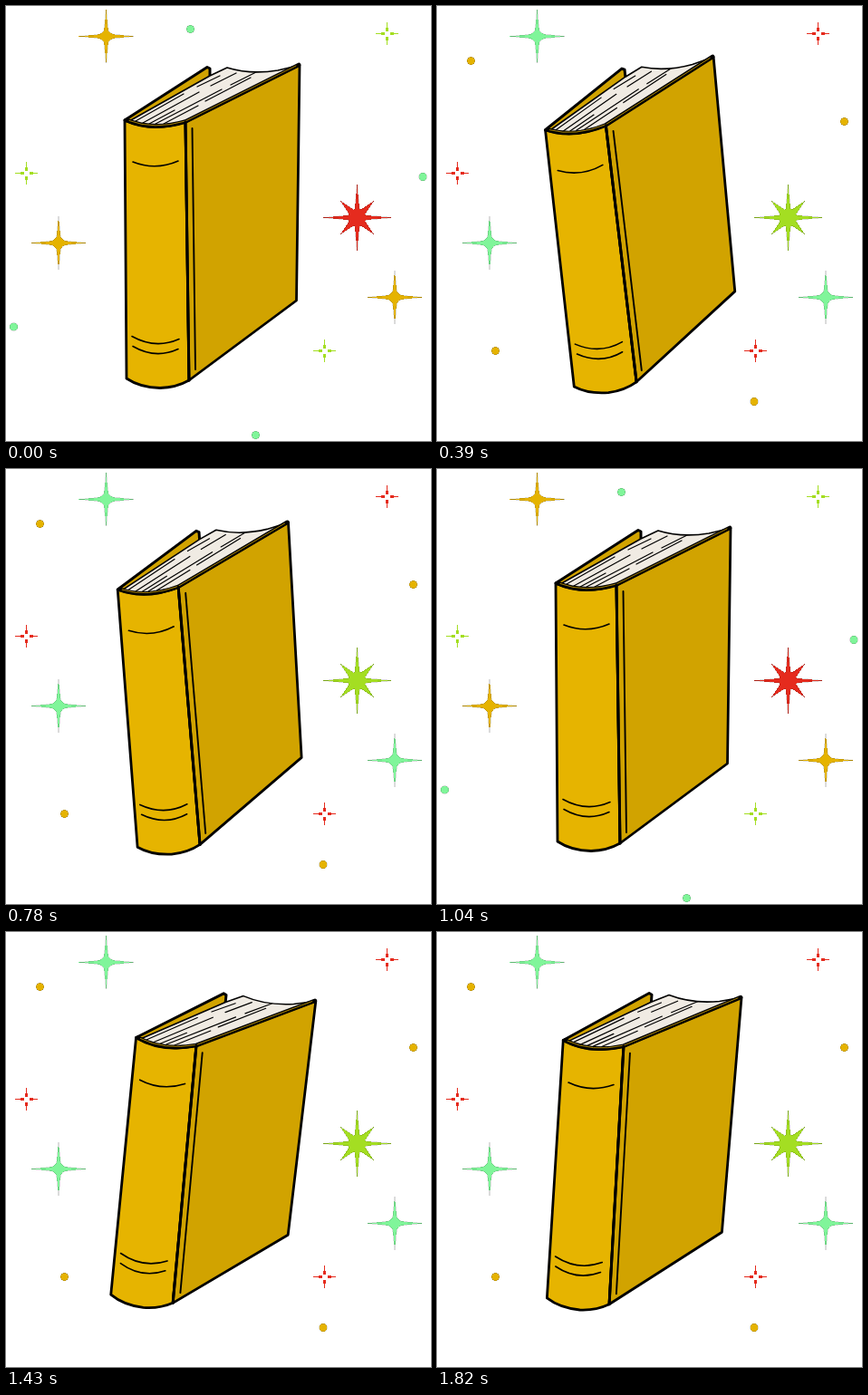
These frames come from a looping animation (469 px wide and 480 px high, 1950 ms). An HTML page:

```html
<!DOCTYPE html>
<html lang="en">
<head>
<meta charset="utf-8">
<title>Swaying book</title>
<style>
html, body { margin: 0; width: 100%; height: 100%; overflow: hidden; background: #fff; }
svg { display: block; width: 469px; height: 480px; }
#sky { shape-rendering: crispEdges; stroke: #0003; stroke-width: .7; }
#book { fill: none; stroke: #000; stroke-linecap: round; stroke-linejoin: round; }
</style>
</head>
<body>
<svg viewBox="0 0 469 480">
  <defs>
    <path id="sparkle" d="M0-29.5 1.8-10Q2.3-2.6 10-1.9L30 0 10 1.9Q2.3 2.6 1.8 10L0 29-1.8 10Q-2.3 2.6-10 1.9L-30 0-10-1.9Q-2.3-2.6-1.8-10Z"/>
    <path id="burst" d="M0-36.500 2.500-10 4-9 18.500-18.500 9-4 10-2.500 37.500 0 10 2.500 9 4 18.500 18.500 4 9 2.500 10 0 36.500-2.500 10-4 9-18.500 18.500-9 4-10 2.500-37.500 0-10-2.500-9-4-18.500-18.500-4-9-2.500-10Z"/>
    <g id="twinkle" stroke="currentColor">
      <path stroke-width="1.200" d="M0-12.500V-3M0 3V12.500M-12.500 0H-3M3 0H12.500"/>
      <path stroke-width="3" d="M0-7V-3M0 3V7M-7 0H-3M3 0H7"/>
    </g>
    <circle id="dot" r="4.400"/>
  </defs>
  <g id="sky"></g>
  <g id="book">
    <path fill="#d1a300" stroke-width="3" d="M131 126 222 67.5 225 69V78L150 128Z"/>
    <path fill="#f0ebe3" stroke-width="1.6" d="M136 127 225 77 244 68Q270 76 300 71L321 66 198 127Q160 136 136 127Z"/>
    <path stroke-width="1.200" d="M143 127 196 97M151 129 213 95M158 130 186 115M165 130 238 92M174 130 212 110M211 89 236 77M226 88 254 74M220 105 270 79M248 87 276 73"/>
    <path fill="#e6b400" stroke-width="2.800" d="M131 126Q160 140 198 128L202 413Q188 421 170 421.500Q148 421 133 411Z"/>
    <path fill="#d1a300" stroke-width="2.800" d="M198 128 324 65 320.500 325 202 413Z"/>
    <path stroke-width="4.600" d="M133 126Q163 138 198 127.500L323 65"/>
    <path stroke="#d1a300" stroke-width=".8" d="M136 126.500Q163 137 198 127L320 66"/>
    <path stroke-width="3" d="M198 128 202 413"/>
    <path stroke-width="1.9" d="M205.500 135 209 401"/>
    <path stroke-width="1.600" d="M140 172Q165 182 190 171M139 364.500Q165 379 191 367.500M140 375.500Q165 390 190 378.500"/>
  </g>
</svg>
<script>
const STEP = 130, STEPS = 15;
const GOLD = '#e5b300', MINT = '#80f59a', RED = '#e52b1e', LIME = '#a4de22';
const sky = document.getElementById('sky'), book = document.getElementById('book');

const place = (shape, color, points) => points.map(([x, y]) =>
  `<use href="#${shape}" x="${x}" y="${y}" fill="${color}" color="${color}"/>`).join('');

const scene = (sparkle, burst, twinkle, dot, dots) => '<g>' +
  place('sparkle', sparkle, [[110.5, 33.5], [58, 261.5], [429, 321.5]]) +
  place('burst', burst, [[387.5, 233.5]]) +
  place('twinkle', twinkle, [[420.5, 30.5], [22.5, 184.5], [351.5, 380.5]]) +
  place('dot', dot, dots) + '</g>';

sky.innerHTML =
  scene(GOLD, RED, LIME, MINT, [[203.5, 25.5], [460, 188.5], [8.5, 354], [275.5, 473.5]]) +
  scene(MINT, LIME, RED, GOLD, [[37.5, 60.5], [449.5, 127.5], [64.5, 380.5], [350, 436.5]]);
const scenes = [...sky.children];

function draw(now) {
  const step = Math.floor(now / STEP) % STEPS;
  const lit = (step >> 1) % 2;
  scenes.forEach((g, i) => g.setAttribute('display', i === lit ? 'inline' : 'none'));
  // triangle wave: 0, -8, 0, 8 degrees over 16 steps
  const angle = 2 * (Math.abs((step + 4) % 16 - 8) - 4);
  book.setAttribute('transform', `rotate(${angle} 228 241)`);
}

const start = performance.now();
function tick() {
  draw(performance.now() - start);
  requestAnimationFrame(tick);
}
tick();
</script>
</body>
</html>
```
